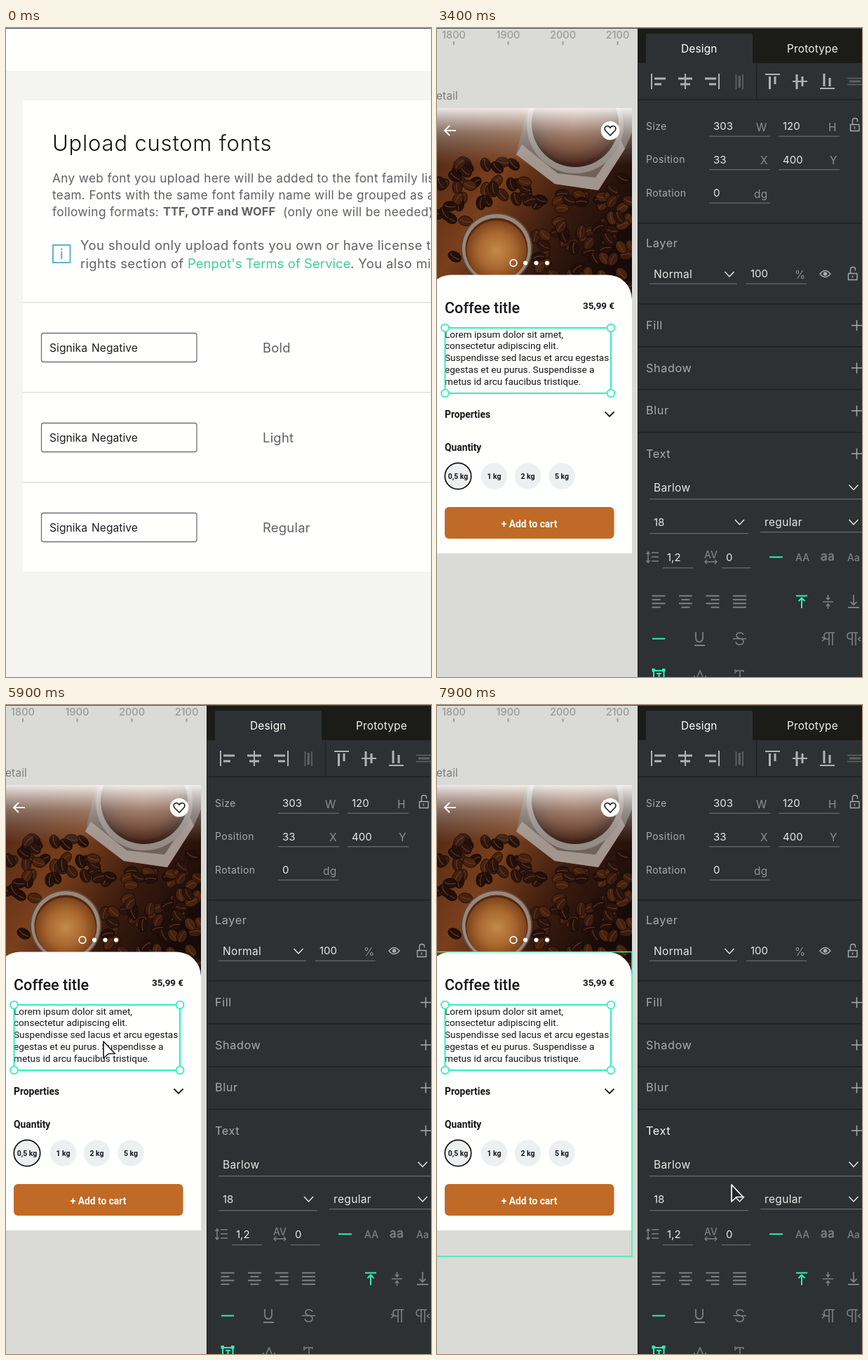
These frames come from a looping animation (606 px wide and 924 px high, 8000 ms). An HTML page:

```html
<!DOCTYPE html>
<html lang="en">
<head>
<meta charset="utf-8">
<title>Custom fonts</title>
<style>
  html, body { margin: 0; width: 100%; height: 100%; overflow: hidden; background: #fffffd; }
  svg { display: block; width: 606px; height: 924px; }
  text { white-space: pre; }
</style>
</head>
<body>
<svg id="stage" viewBox="0 0 606 924" xmlns="http://www.w3.org/2000/svg"></svg>
<script>
const LOOP = 8000, STEP = 100;
const WHITE = '#fffffd', PANEL = '#2d3133', EDGE = '#1e2021', RULE = '#66696b';
const GREEN = '#31efb8', MUTED = '#a9abae', LIGHT = '#e6e6e4', DIM = '#7d8082';

// size, letter spacing, weight, family
const STYLES = {
  title: [31, .8, 300], para: [17.2, .38, 400], strong: [16.3, .15, 700],
  info: [18.4, .4, 400], link: [18.4, .1, 400], cell: [18.4, .25, 400],
  field: [15.6, .05, 400], tab: [15.4, .2, 400], head: [16.3, .58, 400],
  wide: [17, .65, 400], label: [14, .4, 400], num: [15, 0, 400],
  value: [15.5, .35, 400], hex: [16, .4, 400], ruler: [14.5, 0, 500],
  name: [15.3, .2, 400], glyph: [14, 0, 400], caps: [14, 0, 500],
  h1: [21.6, 0, 500, 'Roboto'], body: [13.6, 0, 400, 'Roboto'],
  bold: [13.8, 0, 700, 'Roboto'], chip: [10.5, 0, 700, 'Roboto'], price: [13.4, 0, 700, 'Roboto']
};

const text = (x, cy, s, style, fill, extra = '') => {
  const [size, gap, weight, family = 'Inter'] = STYLES[style];
  return `<text x="${x}" y="${(cy + size * .36).toFixed(1)}" font-size="${size}" letter-spacing="${gap}"
    font-weight="${weight}" font-family="${family}, sans-serif" fill="${fill}" ${extra}>${s}</text>`;
};
const rect = (x, y, w, h, fill, extra = '') =>
  `<rect x="${x}" y="${y}" width="${w}" height="${h}" fill="${fill}" ${extra}/>`;
const line = (d, stroke, w = 1, extra = '') =>
  `<path d="${d}" fill="none" stroke="${stroke}" stroke-width="${w}" ${extra}/>`;
const disc = (x, y, r, fill, extra = '') => `<circle cx="${x}" cy="${y}" r="${r}" fill="${fill}" ${extra}/>`;
const group = (id, ...parts) => `<g id="${id}">${parts.join('')}</g>`;
const box = (x, y, w, h, fill = 'none', stroke = '#85888a') =>
  rect(x + .5, y + .5, w, h, fill, `rx="3" stroke="${stroke}" stroke-width="1.3"`);

/* ---------- font upload page ---------- */
const wave = (x, end) => `M${x} 461.5` + 'q1 2.4 2 0t2 0'.repeat(Math.floor((end - x) / 4));

function uploadPage() {
  const grey = '#5f6064', ink = '#1f1f22';
  const rows = ['Bold', 'Light', 'Regular'].map((weight, i) => {
    const y = 390 + i * 128;
    return rect(24, y, 582, 1.4, '#dcdde0') + box(50, y + 44, 221.5, 41, WHITE, '#6f7078') +
      text(62, y + 65, 'Signika', 'field', ink) +
      text(122, y + 65, 'Negative', 'field', ink) +
      text(366, y + 65, weight, 'cell', grey);
  });
  return group('upload',
    rect(0, 0, 606, 924, '#f4f4f2'), rect(0, 0, 606, 61, WHITE), rect(0, 0, 606, 1, '#4c4c4c'),
    rect(24, 103, 582, 671, WHITE),
    text(66, 164, 'Upload custom fonts', 'title', '#141416'),
    text(66, 214, 'Any web font you upload here will be added to the font family list', 'para', grey),
    text(66, 237.5, 'team. Fonts with the same font family name will be grouped as a', 'para', grey),
    text(66, 261.5, 'following formats:', 'para', grey),
    text(224, 261.5, 'TTF, OTF and WOFF', 'strong', grey),
    text(395, 261.5, '(only one will be needed)', 'para', grey),
    rect(67, 309, 24.5, 25, 'none', 'stroke="#5fb2d0" stroke-width="2"'),
    line('M79.2 318v11M79.2 313.5v2.4', '#5fb2d0', 2),
    text(106, 309, 'You should only upload fonts you own or have license to', 'info', grey),
    text(106, 335, 'rights section of', 'info', grey),
    text(259, 335, "Penpot's Terms of Service", 'link', '#40cb98'),
    text(491, 335, '. You also might', 'info', grey),
    ...rows,
    group('typo', line(wave(62, 116) + wave(122, 187), '#d8232f', 1.3)),
    group('marked', rect(121, 445, 66, 19, '#3c8ee8'), text(122, 455, 'Negative', 'field', WHITE),
      line(wave(122, 187), '#a8324f', 1.3)));
}

/* ---------- canvas with the app screen ---------- */
function seeded(seed) {
  return () => (seed = (seed * 16807) % 2147483647) / 2147483647;
}

function beans() {
  const rnd = seeded(41), tones = ['#2a140d', '#3a1c11', '#47230f', '#220f0a'];
  let out = '';
  for (let i = 0; i < 210; i++) {
    const x = rnd() * 278, y = 185 + rnd() * 205, turn = rnd() * 180, tone = tones[i % 4], keep = rnd();
    const open = x < 140 && y > 275;
    if (Math.hypot(x - 85, y - 314) < 56 || Math.hypot(x - 197, y - 140) < 98 || (open && keep > .15)) continue;
    out += `<g transform="translate(${x.toFixed(1)} ${y.toFixed(1)}) rotate(${turn.toFixed()})">
      <ellipse rx="10" ry="7" fill="${tone}" stroke="#170a06" stroke-width=".8"/>
      <path d="M-8 -1Q0 3 8 0" fill="none" stroke="#6d3c22"/></g>`;
  }
  return out;
}

function photo() {
  return `<g clip-path="url(#shot)">` + rect(0, 114, 278, 273, 'url(#wood)') + beans() +
    `<path d="M131 105L113 180L168 222L230 231L268 172L290 120V105Z" fill="#6f625b"/>
     <path d="M113 180L168 222L230 231L268 172L262 160L226 213L172 207L121 166Z" fill="#a2958d"/>` +
    disc(197, 138, 69, '#968b85') + disc(197, 136, 62, '#3a2118') + disc(195, 134, 58, 'url(#grounds)') +
    disc(85, 314, 51, '#5c4a40') + disc(85, 314, 49, '#9a8779') + disc(85, 315, 44.5, '#54290f') +
    disc(85, 317, 43, 'url(#crema)') +
    rect(0, 114, 278, 82, 'url(#fade)') + '</g>';
}

function appScreen() {
  const ink = '#15151a';
  const chips = ['0,5 kg', '1 kg', '2 kg', '5 kg'].map((s, i) => {
    const x = [30, 81.5, 129.5, 178][i];
    return disc(x, 638, 18.7, '#edf0f1', i ? '' : 'stroke="#111" stroke-width="1.7"') +
      text(x, 638, s, 'chip', ink, 'text-anchor="middle"');
  });
  const lorem = ['Lorem ipsum dolor sit amet,', 'consectetur adipiscing elit.',
    'Suspendisse sed lacus et arcu egestas', 'egestas et eu purus. Suspendisse a',
    'metus id arcu faucibus tristique.'].map((s, i) => text(11, 435.6 + i * 16.8, s, 'body', ink));
  const ruler = [24, 101.5, 179.5, 257.5].map((x, i) =>
    text(x, 9.5, 1800 + i * 100, 'ruler', '#9b9b9b', 'text-anchor="middle"') + rect(x - 1, 19, 2, 5, '#9b9b9b'));
  return rect(0, 0, 287, 924, '#dadad7') + ruler.join('') + text(-1, 96, 'etail', 'name', '#7b7b7e') +
    rect(0, 387, 278, 361, WHITE) + photo() +
    `<path d="M-15 748V386A35 35 0 0 1 20 351.500H243A35 35 0 0 1 278 386V748Z" fill="${WHITE}"/>` +
    line('M27 146H11M18 139L11 146L18 153', WHITE, 2) + disc(247, 146, 13.3, WHITE) +
    line('M247 153L240.500 146.500C236 141 243.500 136.500 247 142C250.500 136.500 258 141 253.500 146.500Z', '#222', 1.6) +
    disc(109, 334.500, 4.8, 'none', `stroke="${WHITE}" stroke-width="1.7"`) +
    [126, 141.5, 157].map(x => disc(x, 334.5, 3.1, WHITE)).join('') +
    text(11, 398, 'Coffee title', 'h1', ink) + text(208, 395.5, '35,99 €', 'price', ink) + lorem.join('') +
    text(11, 550, 'Properties', 'bold', ink) + line('M239.500 546.500L246 553L252.500 546.500', ink, 1.8) +
    text(11, 596.500, 'Quantity', 'bold', ink) + chips.join('') +
    rect(11, 682, 241.5, 45, '#c06a27', 'rx="6"') +
    text(131.5, 705.5, '+ Add to cart', 'bold', WHITE, 'text-anchor="middle"');
}

const handle = (x, y) => disc(x, y, 5.4, WHITE, `stroke="${GREEN}" stroke-width="1.7"`);
const overlays = () =>
  group('hoverPhoto', line('M0 114.5H286M0 387H286', '#5ef0c8', 1.5)) +
  group('hoverGroup', line('M0 351.500H278V785H0', GREEN, 1.5)) +
  group('pickGroup', line('M0 351.500H278V785H0', GREEN, 2.2), handle(278, 351.5), handle(278, 785)) +
  group('pickText', rect(11.5, 427, 236.5, 93, 'none', `stroke="${GREEN}" stroke-width="2"`),
    handle(11.5, 427), handle(248, 427), handle(11.5, 520), handle(248, 520));

/* ---------- side panel ---------- */
const chevron = (x, y) => line(`M${x - 6.5} ${y - 3}L${x} ${y + 4}L${x + 6.5} ${y - 3}`, LIGHT, 1.5);
const under = (x, y, end) => rect(x, y, end - x, 1.3, RULE);
const split = y => rect(287, y, 319, 1.4, EDGE);
const plus = y => line(`M591 ${y}H606M598.500 ${y - 7.5}V${y + 7.5}`, MUTED, 1.5);
const minus = y => line(`M591 ${y}H606`, MUTED, 1.5);
const head = (y, s, id = '') => text(298, y, s, 'head', MUTED, id && `id="${id}"`);
const lock = (x, y) => line(`M${x - 6} ${y - 1}h12.500v9h-12.500zM${x - 3} ${y - 1}v-6q0-3 3.500-3t3.500 3v2M${x} ${y + 2}v3`, MUTED, 1.4);

const tabs = () => rect(286, 0, 320, 924, PANEL) + rect(286, 0, 1.2, 924, EDGE) +
  rect(287, 0, 319, 50, '#1b1c18') + rect(0, 0, 606, 1, '#4c4c4c') +
  `<path d="M298 50V10q0-2 2-2H448q2 0 2 2V50Z" fill="${PANEL}"/>` +
  text(348, 29, 'Design', 'tab', WHITE) + text(499, 29, 'Prototype', 'tab', '#f0f0ee') +
  group('align', line('M306 65V87M354 65V87M402 65V87M468 66H489M507 76H528M546 86H567', 'currentColor', 2),
    line('M310 72H326M310 80H320M344 72H364M347 80H361M382 72H398M388 80H398M474.500 69V87M482 69V80M513 66V87M521 69V83M552 65V83M560 71V83',
      'currentColor', 3)) +
  group('spread', line('M426.500 66V87M436 66V87M585 71.500H606M585 80.500H606', 'currentColor', 1.7),
    line('M431.300 68V85M588 76H604', 'currentColor', 3)) +
  split(101.5) + rect(455, 50, 1.3, 52, EDGE);

function measures(id, w, h, x, y) {
  const cell = (left, row, value, unit, ux) => text(left + 6, row, value, 'num', LIGHT) +
    text(ux, row + 1, unit, 'value', '#8d9092') + under(left, row + 13.5, left + 87);
  return group(id,
    text(298, 139.5, 'Size', 'label', MUTED), cell(388, 140, w, 'W', 455), cell(487, 140, h, 'H', 558),
    lock(595.5, 138.5),
    text(298, 187, 'Position', 'label', MUTED), cell(388, 187.5, x, 'X', 461), cell(487, 187.5, y, 'Y', 560),
    text(298, 234.5, 'Rotation', 'label', MUTED), cell(388, 235, 0, 'dg', 452));
}

const blend = () => split(277) + text(309, 350, 'Normal', 'value', LIGHT) + chevron(417, 350) + under(303, 363.5, 428) +
  text(447, 350, '100', 'num', LIGHT) + text(510, 351, '%', 'value', '#8d9092') + under(441, 363.5, 527) +
  line('M546 350Q553.500 341 561 350Q553.500 359 546 350Z', MUTED, 1.5) + disc(553.5, 350, 2.8, MUTED) +
  lock(592.5, 350.5) + split(392);

function textPanel() {
  const para = [0, 1, 2, 3].map(i => {
    const c = [316, 354.5, 393, 431.5][i];
    return [20, 13, 20, 13].map((w, k) => {
      const len = i === 3 ? 19 : w - 1;
      const x = i === 1 ? c - len / 2 : i === 2 ? c + 9.5 - len : c - 9.5;
      return rect(x, 807.5 + k * 5.4, len, 2, DIM);
    }).join('');
  }).join('');
  return group('textPanel', measures('', 303, 120, 33, 400), head(306, 'Layer', 'Layer'), blend(),
    head(423, 'Fill', 'Fill'), plus(423.5), split(453), head(484, 'Shadow', 'Shadow'), plus(484),
    split(514), head(544.5, 'Blur', 'Blur'), plus(545), split(575), head(606, 'Text', 'Text'), plus(606),
    text(309, 654, 'Barlow', 'value', LIGHT), chevron(594, 653.5), under(303, 670, 606),
    text(309, 703.5, '18', 'num', LIGHT), chevron(431.5, 703),
    rect(303, 719, 141, 1.3, RULE, 'id="sizeRule"'),
    text(467, 703.5, 'regular', 'value', LIGHT), chevron(594, 703), under(461, 717, 606),
    line('M301 747V760M298.500 749L301 746L303.500 749M298.500 758L301 761L303.500 758M306 747H316M306 753H316M306 759H316', DIM, 1.5),
    text(328, 753.5, '1,2', 'num', LIGHT), under(322, 768, 365),
    text(381, 750, 'AV', 'caps', DIM), line('M382 760H399M385 757L382 760L385 763M396 757L399 760L396 763', DIM, 1.3),
    text(412, 753.5, '0', 'num', LIGHT), under(406, 768, 448),
    rect(474, 752.3, 19, 2, GREEN), text(511, 753.5, 'AA', 'caps', DIM),
    text(547, 752, 'aa', 'wide', DIM, 'font-style="normal" stroke="#7d8082" stroke-width=".5"'),
    text(585, 753.5, 'Aa', 'caps', DIM), para,
    line('M512 808.500H528M520 826V812M515.500 816L520 811.500L524.500 816', GREEN, 2),
    line('M550 817H565M557.500 807V813M555 811L557.500 814L560 811M557.500 827V821M555 823L557.500 820L560 823', DIM, 1.6),
    line('M586 825H602M594 807V821M589.500 817L594 821.500L598.500 817', DIM, 1.8),
    rect(307, 868.5, 18, 2, GREEN),
    line('M369 860V868Q369 874 374 874T379 868V860M367 879H382', DIM, 1.8),
    line('M437 864Q436 861 432 861Q427 861 427 865Q427 868 432 869Q438 871 437 874Q436 878 432 878Q427 878 426 874M422 869.500H441', DIM, 1.6),
    line('M567 861H557Q552 861 552 865.500T557 870H559M559 861V879M564 861V879M549 867L552.500 870L549 873', DIM, 1.6),
    line('M600 861H590Q585 861 585 865.500T590 870H592M592 861V879M597 861V879M604 867L600.500 870L604 873', DIM, 1.6),
    line('M309 915H324M309 913V924M323.500 913V924M313 919H320M316.500 919V924', GREEN, 2),
    rect(306.5, 912, 4.5, 4.5, GREEN), rect(321, 912, 4.5, 4.5, GREEN),
    line('M371 924L375 915L379 924M367 922V924M383 922V924M427 917V915H437V917M432 915V924M425 913V919', DIM, 1.5));
}

function groupPanel() {
  return group('groupPanel', measures('', 375, 556, 0, 304), head(306, 'Group layers'), blend(),
    head(423, 'Group fill'), minus(423.5), box(298, 459, 25, 25), text(310.5, 472, '?', 'hex', LIGHT, 'text-anchor="middle"'),
    box(330, 459, 109, 25), text(336, 472, 'Mixed', 'value', LIGHT),
    text(525, 469, '100', 'num', LIGHT), text(588, 470, '%', 'value', '#8d9092'), under(519, 482.5, 606),
    split(511), head(542, 'Group shadow'), plus(542), split(572), head(602.5, 'Group blur'), plus(603),
    split(633), head(663.5, 'Group stroke'), minus(664),
    rect(298, 700, 13, 25, '#000'), rect(311, 700, 12.5, 25, '#717375'), box(298, 700, 25, 25),
    box(330, 700, 109, 25), text(336, 713, '000000', 'hex', LIGHT),
    text(526, 710, 'Mixed', 'field', LIGHT), under(519, 724.5, 606),
    text(309, 757.5, 'Mixed', 'field', '#66696b'), under(303, 771, 390),
    text(408, 757.5, 'Center', 'value', LIGHT), chevron(486, 757), under(402, 771, 498),
    text(517, 757.5, '--', 'value', LIGHT), chevron(594, 757), under(510, 771, 606),
    split(800), head(829.5, 'Group text'), plus(830),
    rect(303.5, 860.5, 320, 47, 'none', 'rx="3" stroke="#85888a" stroke-dasharray="4 3"'),
    text(315, 884, 'Multiple typographies', 'head', MUTED),
    line('M582 879L578 883Q575 886 578 889T584 889L587 886M586 882L590 878Q593 875 595 878T594 884L590 888M576 877L579 880M591 890L594 893M584 875V878', LIGHT, 1.5));
}

const canvasPanel = () => group('canvasPanel', text(298, 130, 'Canvas background', 'wide', MUTED),
  box(298, 160, 25, 25, '#dadad7'), box(330, 160, 109, 25), text(336, 173, 'dcdbdd', 'hex', LIGHT), split(208));

const defs = `<defs>
  <clipPath id="shot"><rect y="114" width="278" height="273"/></clipPath>
  <linearGradient id="wood" x2="1" y2=".6"><stop stop-color="#4a2312"/><stop offset=".4" stop-color="#7a3f1c"/>
    <stop offset=".7" stop-color="#3a1b0e"/><stop offset="1" stop-color="#160b08"/></linearGradient>
  <linearGradient id="fade" x2="0" y2="1"><stop stop-color="#fff" stop-opacity=".9"/>
    <stop offset=".45" stop-color="#d8d4d2" stop-opacity=".38"/><stop offset="1" stop-color="#aaa" stop-opacity="0"/></linearGradient>
  <radialGradient id="grounds"><stop stop-color="#8a5033"/><stop offset=".7" stop-color="#6b3a24"/><stop offset="1" stop-color="#492618"/></radialGradient>
  <radialGradient id="crema"><stop stop-color="#c48a4c"/><stop offset=".6" stop-color="#a9672f"/><stop offset="1" stop-color="#7c431c"/></radialGradient>
</defs>`;

document.getElementById('stage').innerHTML = defs +
  group('editor', appScreen(), overlays(), tabs(), canvasPanel(), groupPanel(), textPanel()) + uploadPage() +
  `<g id="cursor"><path id="arrow" d="M1 1V25L8 18.500H17.500Z" stroke-width="1.7" stroke-linejoin="round"/>
   <path id="beam" d="M-5 -12Q0 -12 0 -9Q0 -12 5 -12M0 -9V9M-5 12Q0 12 0 9Q0 12 5 12" fill="none" stroke="#111" stroke-width="1.7"/></g>`;

/* ---------- timeline ---------- */
// each run: cursor points [ms, x, y]; it is hidden from `off`
const RUNS = [
  { off: 2400, pts: [[600, 181, 203], [800, 179, 262], [1000, 175, 355], [1200, 170, 430], [1400, 167, 451],
    [2100, 167, 451], [2200, 171, 453], [2300, 180, 452]] },
  { off: LOOP, pts: [[4400, 38, 276], [4600, 66, 338], [4800, 114, 436], [5000, 138, 478], [6100, 138, 478],
    [6200, 150, 476], [6300, 190, 468], [6400, 255, 455], [6500, 323, 435], [6600, 395, 385], [6700, 470, 290],
    [6800, 557, 120], [6900, 545, 14], [7000, 509, 18], [7100, 470, 110], [7200, 435, 280], [7300, 415, 450],
    [7400, 408, 620], [7500, 410, 728], [7600, 410, 728], [7700, 414, 750], [7800, 420, 715], [7900, 419, 682]] }
];
const SECTIONS = { Layer: [277, 392], Fill: [393, 453], Shadow: [454, 514], Blur: [515, 575], Text: [576, 924] };

function pointer(t) {
  const run = RUNS.find(r => t >= r.pts[0][0] && t < r.off);
  if (!run) return null;
  const i = run.pts.findIndex(p => p[0] > t);
  if (i < 0) return run.pts[run.pts.length - 1].slice(1);
  const [a, b] = [run.pts[i - 1], run.pts[i]], k = (t - a[0]) / (b[0] - a[0]);
  return [a[1] + (b[1] - a[1]) * k, a[2] + (b[2] - a[2]) * k];
}

const el = id => document.getElementById(id);
const show = (id, on) => { el(id).style.display = on ? '' : 'none'; };

function draw(t) {
  const pos = pointer(t), idle = t >= 3900 && t < 5400;
  show('upload', t < 3400);
  show('editor', t >= 3400);
  show('typo', t >= 1400);
  show('marked', t >= 1500);
  show('canvasPanel', idle);
  show('groupPanel', t >= 5400 && t < 5900);
  show('textPanel', t < 3900 || t >= 5900);
  show('pickText', t < 3900 || t >= 5500);
  show('pickGroup', t >= 5400 && t < 5500);
  show('hoverPhoto', idle && pos && pos[1] < 351);
  show('hoverGroup', (idle && pos && pos[1] >= 351) || t >= 6300);
  el('align').style.color = idle ? '#6f7274' : '#b1b2b4';
  el('spread').style.color = idle ? '#808385' : '#606365';

  // section titles light up one step ahead of the drawn pointer
  const next = t >= 6200 ? pointer(Math.min(t + STEP, LOOP - STEP)) : null;
  for (const [id, [top, end]] of Object.entries(SECTIONS)) {
    const hot = next && next[0] > 287 && next[1] >= top && next[1] <= end;
    el(id).setAttribute('fill', hot ? '#f4f4f2' : MUTED);
  }
  const onSize = t >= 7700 && pos[1] > 690 && pos[1] < 720;
  el('sizeRule').setAttribute('fill', onSize ? LIGHT : RULE);

  show('cursor', pos);
  if (!pos) return;
  const beam = t >= 1200 && t < 2300, onCanvas = t >= 3400 && pos[0] < 287;
  show('beam', beam);
  show('arrow', !beam);
  el('cursor').setAttribute('transform', `translate(${pos[0].toFixed(1)} ${pos[1].toFixed(1)})`);
  el('arrow').setAttribute('fill', onCanvas ? WHITE : '#22252a');
  el('arrow').setAttribute('stroke', onCanvas ? '#22252a' : WHITE);
}

const start = performance.now();
function tick() {
  const t = (performance.now() - start) % LOOP;
  draw(Math.floor(t / STEP) * STEP);
  requestAnimationFrame(tick);
}
tick();
</script>
</body>
</html>
```
